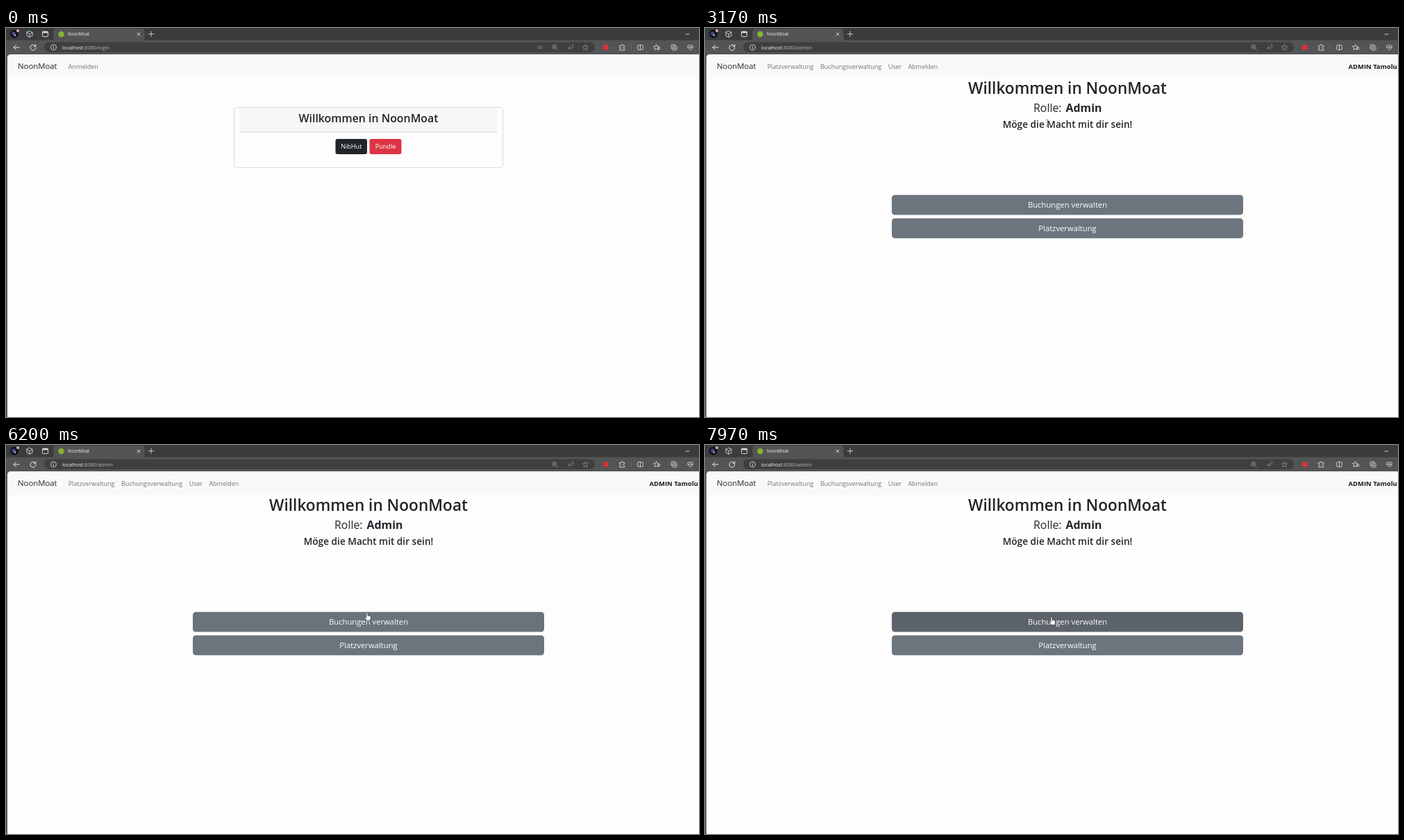
An HTML page with a canvas that plays this animation: 998x561 px, repeating every 8000 ms.

```html
<!DOCTYPE html>
<html lang="de">
<head>
<meta charset="utf-8">
<title>NoonMoat</title>
<style>
  html, body { margin: 0; width: 100%; height: 100%; overflow: hidden; background: #fdfdfd; }
  canvas { display: block; width: 998px; height: 561px; }
</style>
</head>
<body>
<canvas id="stage" width="998" height="561"></canvas>
<script>
const ctx = document.getElementById('stage').getContext('2d');
const LOOP = 8000;
const LOAD_START = 1540, ADMIN_START = 2570;
const APP = 'NoonMoat';
const INK = '#212529', MUTED = '#737475', ICON = '#d6d6d6', DIM = '#8e8e8e';

// time, x, y of the pointer's hot spot
const PATH = [
  [30, 990, 14], [480, 560, 212], [850, 486, 171], [2600, 486, 171],
  [3050, 493, 137], [3380, 493, 137], [3800, 610, 137], [4200, 760, 110],
  [4750, 935, 56], [5150, 970, 52], [5430, 946, 42], [5520, 944, 44],
  [5830, 650, 192], [6300, 503, 248], [6490, 500, 256], [6590, 500, 282],
  [7000, 502, 291], [7480, 500, 287], [7720, 499, 248], [8000, 499, 248]
];

const BUTTONS = {
  login: [
    { x: 474.5, y: 160, w: 45.5, h: 22, r: 3, label: 'NibHut', size: 9.1, base: [33, 37, 41], hot: [66, 70, 73] },
    { x: 523.5, y: 160, w: 46, h: 22, r: 3, label: 'Pundle', size: 9.1, base: [220, 53, 69], hot: [187, 45, 59] }
  ],
  admin: [
    { x: 269, y: 240.7, w: 506, h: 28.8, r: 4.5, label: 'Buchungen verwalten', size: 11.25, base: [108, 117, 125], hot: [92, 99, 106] },
    { x: 269, y: 274.5, w: 506, h: 28.8, r: 4.5, label: 'Platzverwaltung', size: 11.25, base: [108, 117, 125], hot: [92, 99, 106] }
  ]
};
const TEXT_ZONES = {
  login: [{ x: 420, y: 122, w: 204, h: 18 }],
  admin: [
    { x: 377, y: 76, w: 290, h: 24 }, { x: 473, y: 107, w: 98, h: 17 },
    { x: 428, y: 131, w: 188, h: 16 }, { x: 926, y: 50, w: 72, h: 11 }
  ]
};

const inside = (p, b) => p.x >= b.x && p.x <= b.x + b.w && p.y >= b.y && p.y <= b.y + b.h;

function pointerAt(t) {
  const i = PATH.findIndex(k => k[0] > t);
  if (i < 1) return { x: -50, y: -50 };
  const [t0, x0, y0] = PATH[i - 1], [t1, x1, y1] = PATH[i];
  const u = (t - t0) / (t1 - t0), e = u * u * (3 - 2 * u);
  return { x: x0 + (x1 - x0) * e, y: y0 + (y1 - y0) * e };
}

// share of the last 150 ms spent over the button
function heat(b, t) {
  let sum = 0;
  for (let i = 0; i < 10; i++) sum += inside(pointerAt(t - i * 15), b);
  return sum / 10;
}

function box(x, y, w, h, r, fill, stroke, lw = 1) {
  ctx.beginPath();
  ctx.roundRect(x, y, w, h, r);
  paint(fill, stroke, lw);
}

function paint(fill, stroke, lw = 1) {
  if (fill) { ctx.fillStyle = fill; ctx.fill(); }
  if (stroke) { ctx.strokeStyle = stroke; ctx.lineWidth = lw; ctx.stroke(); }
}

function disc(x, y, r, fill, stroke, lw) {
  ctx.beginPath();
  ctx.arc(x, y, r, 0, Math.PI * 2);
  paint(fill, stroke, lw);
}

function draw(d, x, y, stroke, fill, lw = 1) {
  const path = new Path2D(d);
  ctx.save();
  ctx.translate(x, y);
  ctx.lineCap = ctx.lineJoin = 'round';
  if (fill) { ctx.fillStyle = fill; ctx.fill(path); }
  if (stroke) { ctx.strokeStyle = stroke; ctx.lineWidth = lw; ctx.stroke(path); }
  ctx.restore();
}

function text(s, x, y, size, color, weight = 400, align = 'left') {
  ctx.font = `${weight} ${size}px "Open Sans", "Noto Sans", sans-serif`;
  ctx.textAlign = align;
  ctx.fillStyle = color;
  ctx.fillText(s, x, y);
  return ctx.measureText(s).width;
}

function star(x, y, color) {
  ctx.beginPath();
  for (let i = 0; i < 10; i++) {
    const a = -Math.PI / 2 + i * Math.PI / 5, r = i % 2 ? 2 : 4.3;
    ctx.lineTo(x + r * Math.cos(a), y + r * Math.sin(a));
  }
  ctx.closePath();
  paint(null, color, 0.9);
}

function tabStrip(t, loading) {
  ctx.fillStyle = '#3b3c3d';
  ctx.fillRect(0, 0, 998, 18);
  disc(12, 8.5, 6, '#11131f');
  disc(11, 8, 2.6, '#4a4f86');
  disc(13, 10.5, 1.3, '#b9bcd8');
  disc(17, 4, 2, '#e8b3a8');
  draw('M0 -4.5L4 -2.5V2.5L0 4.5L-4 2.5V-2.5ZM-4 -2.5L0 0L4 -2.5M0 0V4.5', 34, 8.7, ICON, null, 0.9);
  box(52.5, 5, 8, 7.5, 1.3, null, ICON);
  ctx.fillStyle = ICON;
  ctx.fillRect(52.5, 5, 8, 2.3);
  box(68.5, 1, 131, 20, 4, '#535455');
  if (loading) {
    const a = Math.PI * 0.9 - (t - 2230) / 1000 * Math.PI * 2;
    ctx.beginPath();
    ctx.arc(79.5, 8.7, 4, a, a + Math.PI * 0.55);
    paint(null, '#e4e4e4', 1.2);
  } else {
    disc(79.5, 9, 4.2, '#86b62f');
  }
  text(APP, 89, 11, 6.25, '#f2f2f2');
  draw('M-2 -2L2 2M2 -2L-2 2', 191, 8.9, '#e6e6e6', null, 0.9);
  draw('M-3.7 0H3.7M0 -3.7V3.7', 209, 8.6, ICON, null, 0.9);
  draw('M-2.5 0H2.5', 981.5, 9, ICON, null, 0.9);
}

function toolbar(loading, admin) {
  ctx.fillStyle = '#535455';
  ctx.fillRect(0, 17.5, 998, 43);
  draw('M4 0H-4M-0.5 -3.5L-4 0L-0.5 3.5', 15, 28, '#ececec');
  if (loading) draw('M-3 -3L3 3M3 -3L-3 3', 39, 28, '#ececec');
  else draw('M3.6 -1.5A4 4 0 1 0 4 0.5M3.9 -4V-1.3H1.2', 39, 28, '#ececec');
  box(55, 20.5, 793, 14.5, 7.2, '#3e3f40');
  disc(68.5, 28, 4, null, ICON, 0.9);
  draw('M0 -0.3V2M0 -2V-1.8', 68.5, 28, ICON, null, 0.9);
  const w = text('localhost', 81, 30.5, 7.25, '#f4f4f4');
  text(':8080/' + (admin ? 'admin' : 'login'), 81 + w, 30.5, 7.25, '#b4b4b4');

  if (!admin) text('ab', 769, 30.3, 7, DIM, 400, 'center');
  disc(789.7, 27.3, 3.1, null, DIM, 0.9);
  draw('M2 2L4 4.3M-2.2 -0.7H0.8M-0.7 -2.2V0.8', 790.4, 28, DIM, null, 0.9);
  text('A', 811.8, 31, 8, DIM, 400, 'center');
  draw('M0 -2Q1 0 0 2M1.5 -3Q3 0 1.5 2.5', 815, 26, DIM, null, 0.6);
  star(834.5, 28.2, DIM);
  disc(863.7, 28, 4, '#dc2f35');
  draw('M-3.5 -2.5H-1Q-1 -4.5 0.2 -4.5Q1.4 -4.5 1.4 -2.5H3.5V-0.6Q1.5 -0.6 1.5 0.7Q1.5 2 3.5 2V4H-3.5V1.8Q-1.8 1.8 -1.8 0.6Q-1.8 -0.6 -3.5 -0.6Z', 887.3, 28, ICON, null, 0.9);
  draw('M0 -4V4', 900.5, 28, '#707070', null, 0.8);
  box(909.7, 24.7, 7.6, 6.6, 1, null, ICON, 0.9);
  draw('M0 -3.5V3.5', 913.5, 28, ICON, null, 0.9);
  star(936.5, 28, ICON);
  draw('M0 0H3M0 2H3', 939, 28.5, ICON, null, 0.9);
  box(958, 24, 6, 6, 1.2, null, ICON, 0.9);
  box(960, 26, 6, 6, 1.2, '#535455', ICON, 0.9);
  draw('M-1.5 0H1.5M0 -1.5V1.5', 963, 29, ICON, null, 0.8);
  draw('M0 3.7L-3.6 0Q-4.5 -3 -2 -3.4Q-0.5 -3.4 0 -2Q0.5 -3.4 2 -3.4Q4.5 -3 3.6 0ZM-3.5 0H-1L0 -1.5L1 1L1.6 0H3.5', 985.5, 28, ICON, null, 0.9);
}

function navBar(admin) {
  ctx.fillStyle = '#535457';
  ctx.fillRect(0, 38, 10, 523);
  box(2, 38, 1010, 540, [5, 0, 0, 0], '#fdfdfd');
  box(2, 38, 1010, 33.5, [5, 0, 0, 0], '#f8f9fa');
  text(APP, 17, 59.2, 11.35, INK);
  const links = admin
    ? [['Platzverwaltung', 89.7], ['Buchungsverwaltung', 166], ['User', 263.7], ['Abmelden', 292.4]]
    : [['Anmelden', 89.8]];
  for (const [label, x] of links) text(label, x, 58.7, 9, MUTED);
  if (admin) text('ADMIN Tamolu', 926.5, 58.8, 9.45, '#17191c', 700);
}

function loginPage() {
  box(328.5, 114.5, 387, 87, 4, '#fdfdfd', '#d6d8da');
  ctx.fillStyle = '#f6f6f6';
  ctx.fillRect(336, 115, 372, 35);
  ctx.fillStyle = '#d4d5d0';
  ctx.fillRect(336, 149.5, 372, 1);
  text('Willkommen in ' + APP, 522, 136.4, 15.9, INK, 600, 'center');
}

function adminPage() {
  text('Willkommen in ' + APP, 522, 95.2, 22.6, INK, 600, 'center');
  text('Rolle:', 473, 121, 15.9, INK, 500);
  text('Admin', 571.5, 121, 15.9, INK, 700, 'right');
  text('Möge die Macht mit dir sein!', 522, 143.8, 13.65, INK, 600, 'center');
}

function button(b, t) {
  const k = heat(b, t);
  const rgb = b.base.map((c, i) => Math.round(c + (b.hot[i] - c) * k));
  box(b.x, b.y, b.w, b.h, b.r, `rgb(${rgb})`);
  text(b.label, b.x + b.w / 2, b.y + b.h / 2 + b.size * 0.36, b.size, '#fff', 400, 'center');
}

function statusBar() {
  box(-4, 557.3, 138.5, 12, 3, '#4b4c4d', '#6a6b6c', 0.6);
  text('localhost:8080/oauth2/authorization/nibhut', 4, 565.2, 6, '#d8d8d8');
}

function pointer(t, page) {
  const p = pointerAt(t);
  if (BUTTONS[page].some(b => inside(p, b))) {
    draw('M-1 0.8Q0 -0.6 1 0.8V4.3L4.2 5Q5.8 5.4 5.5 7L4.8 11.5H-0.3L-3 7.8Q-3.6 6.5 -2.3 6.5L-1 7.5Z', p.x, p.y, '#33363a', '#fff', 0.7);
  } else if (TEXT_ZONES[page].some(b => inside(p, b))) {
    draw('M-1.5 -4.5H1.5M0 -4.5V4.5M-1.5 4.5H1.5', p.x, p.y, '#77797b', null, 0.8);
  } else {
    draw('M0 0V9.5L2.2 7.5L3.6 10.7L5 10.1L3.6 7H6.6Z', p.x, p.y, '#8d9194', '#fff', 0.6);
  }
}

function frame(now) {
  const t = now % LOOP;
  const admin = t >= ADMIN_START;
  const page = admin ? 'admin' : 'login';
  const loading = t >= LOAD_START && !admin;
  tabStrip(t, loading);
  toolbar(loading, admin);
  navBar(admin);
  if (admin) adminPage(); else loginPage();
  for (const b of BUTTONS[page]) button(b, t);
  if (t >= 950 && t < LOAD_START) statusBar();
  pointer(t, page);
}

const start = performance.now();
function tick() {
  frame(performance.now() - start);
  requestAnimationFrame(tick);
}
tick();
</script>
</body>
</html>
```
